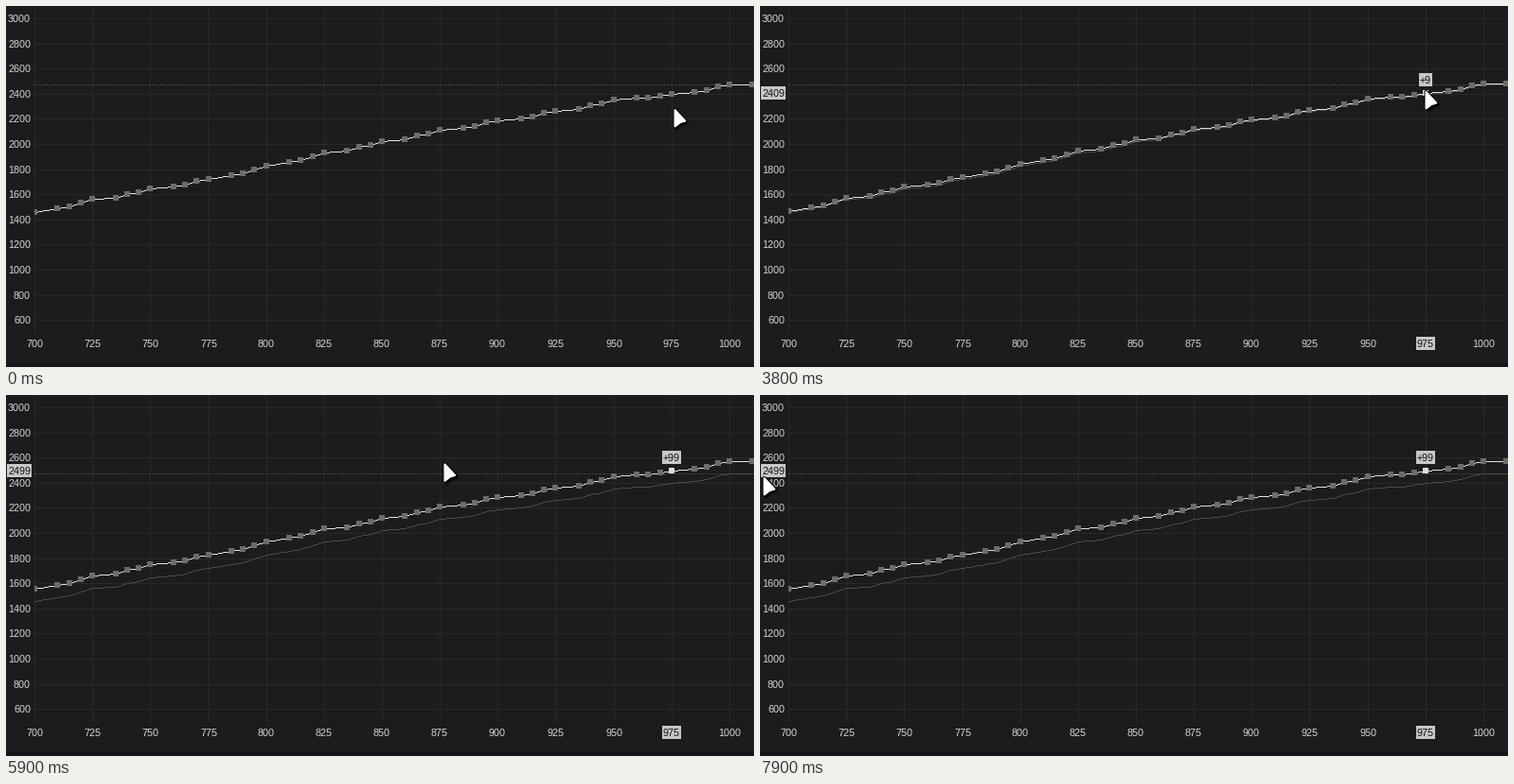
Recreate the animation shown at these times as a matplotlib script. Size 790 px wide and 382 px high, loop 8000 ms.

```python
import numpy as np
import matplotlib.pyplot as plt
from matplotlib.animation import FuncAnimation
from matplotlib.patches import Polygon, Rectangle

W, H, DPI = 790, 382, 100
PX = 72 / DPI
FRAMES, STEP = 80, 100

BG, GRID, INK = "#1c1c1e", "#29292b", "#d2d2d2"
GHOST, CURVE, DOT, TAG = "#4b4b4b", "#e0e0e0", "#6c6c6c", "#c8c8c8"

plt.rcParams.update({
    "font.family": "Liberation Sans",
    "font.size": 11 * PX,
    "text.hinting": "native",
    "text.hinting_factor": 1,
    "path.simplify": False,
    "toolbar": "None",
})

fig = plt.figure(figsize=(W / DPI, H / DPI), dpi=DPI, facecolor=BG)
ax = fig.add_axes([0, 0, 1, 1])
ax.set(xlim=(0, W), ylim=(H, 0))
ax.axis("off")


def sx(v):
    return np.round(30 + (np.asarray(v) - 700) * 734 / 300)


def sy(v):
    return np.round(13.1 + (3000 - np.asarray(v)) * 319 / 2400)


def line(x, y, color, z, **kw):
    ax.plot(x, y, color=color, lw=PX, snap=True, zorder=z, **kw)


def text(x, y, s, color, z, ha="center"):
    return ax.text(x, y + 4, s, color=color, ha=ha, va="baseline", zorder=z)


class Tag:
    """Dark text on a light box, centred on a point."""

    def __init__(self):
        self.box = ax.add_patch(Rectangle((0, 0), 1, 14, fc=TAG, lw=0, zorder=7))
        self.label = text(0, 0, "", "#111111", 8)

    def show(self, x, y, s, on):
        w = round(6 * len(s) + 2 - 2.4 * s.count("-"))
        self.box.set_bounds(round(x - w / 2), y - 7, w, 14)
        self.label.set_text(s)
        self.label.set_position((x, y + 4))
        self.box.set_visible(on)
        self.label.set_visible(on)


# Grid and axes
for v in range(700, 1001, 25):
    line([sx(v)] * 2, [0, 346], GRID, 1)
    text(sx(v), 357, str(v), INK, 6)
for v in range(600, 3001, 200):
    line([30, W], [sy(v)] * 2, GRID, 1)
    text(26, sy(v), str(v), INK, 6, ha="right")
ax.add_patch(Rectangle((0, 378), W, 4, fc="#19131a", lw=0, zorder=1))
line([30, W], [sy(2475)] * 2, GHOST, 2, dashes=(2, 2))

# Curve: four points per 25 units, values in whole steps of 15
ticks = np.array([b + k for b in range(700, 1001, 25) for k in (0, 10, 15, 20)][:50])
levels = [-1, 6, 12, 17, 24, 31, 37, 43, 48, 53, 59, 62, 67]
trend = np.interp(np.arange(50), np.arange(0, 49, 4), levels)
values = 1470 + 15 * np.round(trend - 0.1)
xs = sx(ticks)
cols = np.arange(30, W)
pick = ticks == 975


def thin_curve(color, z):
    return ax.plot([], [], ",", color=color, zorder=z)[0]


def trace(curve, ys):
    """One pixel per column, as an unsmoothed line."""
    curve.set_data(cols, np.round(np.interp(cols, xs, ys)) + 1)


def squares(color, z):
    dots, = ax.plot([], [], "s", color=color, ms=6 * PX, mew=0, zorder=z,
                    antialiased=False)
    dots.set_clip_path(Rectangle((30, 0), W - 30, 346, transform=ax.transData))
    return dots


trace(thin_curve(GHOST, 3), sy(values))
curve = thin_curve(CURVE, 4)
dots, picked = squares(DOT, 5), squares("#dedede", 5.5)
value_tag, delta_tag, x_tag = Tag(), Tag(), Tag()

# Pointer
ARROW = np.array([(1.5, 2), (12.3, 13.6), (7, 15.2), (1.5, 19.5)])


def arrow(color, width, z, **kw):
    return ax.add_patch(Polygon(ARROW, fc=color, ec=color, lw=width * PX,
                                joinstyle="round", zorder=z, **kw))


shadow = arrow("black", 4, 10, alpha=0.55)
rim = arrow("black", 4, 11)
body = arrow("white", 2, 12)


def lift(i):
    """Pixels the curve has been dragged upwards."""
    return round(np.interp(i, [36, 38, 41, 45, 49, 50], [0, 2, 8, 12, 12, 14]))


def pointer(i):
    if i < 6:
        return 705, 108
    if i <= 55:
        return 702, 91 - lift(i)
    if i < 67:
        t = min((i - 55) / 10, 1)
        ease = t * t * (3 - 2 * t)
        return 702 - 682 * ease, 77 + 11 * ease - 10 * np.sin(np.pi * t)
    sway = np.cos(np.pi * (i - 67) / 4)
    return 11.5 + 8.5 * sway, 87 + sway


def draw(i):
    hover = i >= 6
    delta = int(np.floor(-6 + 7.5 * lift(i)))
    ys = sy(values + max(delta, 0))
    trace(curve, ys)
    dots.set_data(xs, ys)
    picked.set_data(xs[pick], ys[pick])
    picked.set_visible(hover)

    y = sy(2400 + delta)
    value_tag.show(14, y, str(2400 + delta), hover)
    delta_tag.show(703, y - 14, f"{delta:+d}", hover)
    x_tag.show(703, 357, "975", hover)

    tip = ARROW + pointer(i)
    shadow.set_xy(tip + 2)
    rim.set_xy(tip)
    body.set_xy(tip)
    return []


anim = FuncAnimation(fig, draw, frames=FRAMES, init_func=lambda: draw(0),
                     interval=STEP, repeat=True, repeat_delay=0, blit=False)
plt.show()
```
